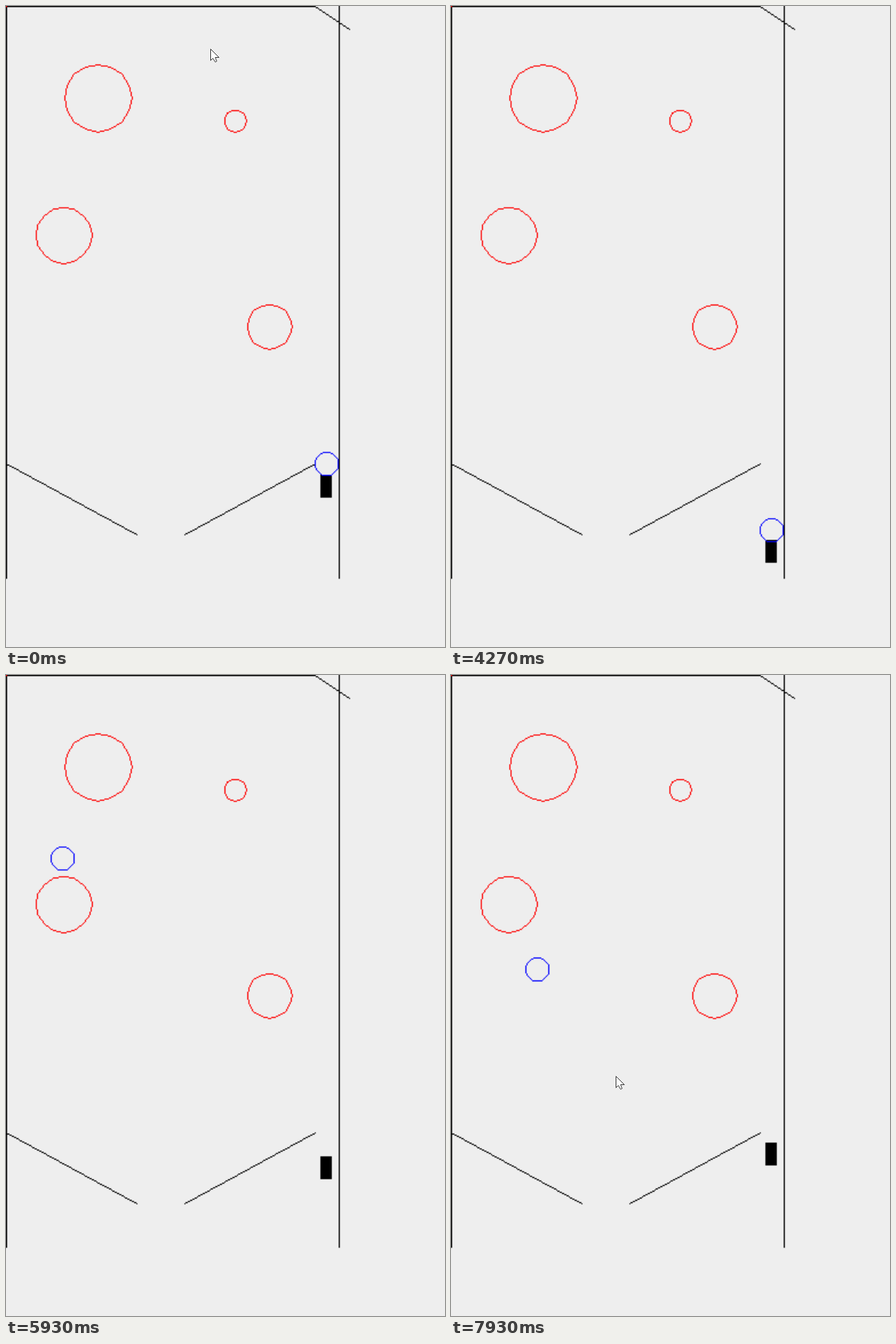
An HTML page with a canvas for the animation above (8000 ms loop, 576x841 px).

```html
<!DOCTYPE html>
<html lang="en">
<head>
<meta charset="utf-8">
<title>Pinball table</title>
<style>
  html, body { margin: 0; width: 100%; height: 100%; overflow: hidden; background: #eee; }
  canvas { display: block; width: 100vw; height: 100vh; }
</style>
</head>
<body>
<canvas id="stage" width="576" height="841"></canvas>
<script>
// The table is drawn on a small hard-edged board, then enlarged by half
const ZOOM = 1.5, LOOP = 8000, TICK = 200 / 3;
const PULL = 3600, LAUNCH = 4870, BOUNCE = 5470, CURSOR_IN = 7730, LAST = 7930;

const stage = document.getElementById('stage').getContext('2d');
const board = document.createElement('canvas');
board.width = 384;
board.height = 561;
const ctx = board.getContext('2d');

const walls = [
  [0, 0, 0, 500], [0, 0, 270, 0], [291, 0, 291, 500],
  [270, 0, 300, 20], [0, 400, 114, 462], [270, 400, 156, 462]
];
const bumpers = [[80, 80, 30], [200, 100, 10], [50, 200, 25], [230, 280, 20]];

// Legs of the ball's flight: each bounces from point to point at an even speed
const flight = [
  { from: LAUNCH, to: BOUNCE, points: [[280, 492], [280, 23]] },
  { from: BOUNCE, to: 6400, points: [[280, 23], [280, 18], [108, 109], [53, 166], [10, 100], [78, 10], [155, 86]] },
  { from: 6400, to: 7200, points: [[155, 86], [182, 108], [200, 426], [26, 288]] },
  { from: 7200, to: LAST, points: [[26, 288], [10, 274], [62, 233], [201, 287], [44, 412], [75, 257]] }
];

const mix = (a, b, u) => a.map((v, i) => v + (b[i] - v) * u);

// Point at the share u of a polyline's length
function along(points, u) {
  const lengths = points.slice(1).map((p, i) => Math.hypot(p[0] - points[i][0], p[1] - points[i][1]));
  let left = u * lengths.reduce((a, b) => a + b);
  let i = 0;
  while (i < lengths.length - 1 && left > lengths[i]) left -= lengths[i++];
  return mix(points[i], points[i + 1], Math.min(1, left / lengths[i]));
}

function ballAt(t) {
  if (t < PULL) return [280, 400];
  if (t < LAUNCH) return [280, 420 + 3.78 * (t - PULL) / TICK];
  const leg = flight.find(l => t <= l.to);
  return along(leg.points, (t - leg.from) / (leg.to - leg.from));
}

// Pulled down ever faster, then easing back after the launch
function plungerAt(t) {
  if (t < PULL) return 410;
  const n = (t - PULL) / TICK;
  if (t <= LAUNCH) return 432 + 2.74 * n + 0.07 * n * n;
  return 408.3 + 101 * Math.exp(-0.13 * (t - LAUNCH) / TICK);
}

function line(x0, y0, x1, y1) {
  const n = Math.max(Math.abs(x1 - x0), Math.abs(y1 - y0)) || 1;
  for (let i = 0; i <= n; i++) {
    ctx.fillRect(Math.round(x0 + (x1 - x0) * i / n), Math.round(y0 + (y1 - y0) * i / n), 1, 1);
  }
}

function ring(x, y, r, sides, snap, color) {
  const corner = i => {
    const a = (i % sides) * 2 * Math.PI / sides;
    return [x + snap(r * Math.cos(a)), y + snap(r * Math.sin(a))];
  };
  ctx.fillStyle = color;
  for (let i = 0; i < sides; i++) line(...corner(i), ...corner(i + 1));
}

// Cuts towards the centre, so only the rightmost corner keeps the full radius
const cut = v => Math.trunc(v > 0 ? v : v + 1e-6);

function drawCursor([x, y]) {
  stage.save();
  stage.translate(Math.round(x) + 0.5, Math.round(y) + 0.5);
  const arrow = new Path2D('M0 0V15L3 12L6 17L8 16L6 11H11Z');
  stage.fillStyle = '#fff';
  stage.fill(arrow);
  stage.strokeStyle = '#444';
  stage.stroke(arrow);
  stage.restore();
}

function draw(t) {
  ctx.fillStyle = '#eee';
  ctx.fillRect(0, 0, 384, 561);
  ctx.fillStyle = '#000';
  walls.forEach(w => line(...w));
  ctx.fillRect(275, Math.round(plungerAt(t)), 10, 20);
  ctx.fillStyle = '#f00';
  ctx.fillRect(0, 0, 1, 1);
  bumpers.forEach(([x, y, r]) => ring(x, y, r, 16, cut, '#f00'));
  const [x, y] = ballAt(t).map(Math.round);
  ring(x, y, 10, 24, Math.round, '#00f');

  stage.drawImage(board, 0, 0, 384 * ZOOM, 561 * ZOOM);
  if (t < 70) drawCursor([268, 56]);
  if (t >= CURSOR_IN) drawCursor(mix([190, 46], [216, 526], (t - CURSOR_IN) / (LAST - CURSOR_IN)));
}

// The table updates 15 times a second
function tableTime(ms) {
  const k = Math.floor((ms + 3.4) / TICK);
  return Math.min(LAST, Math.round(k * TICK / 10) * 10);
}

const start = performance.now();
function loop() {
  draw(tableTime((performance.now() - start) % LOOP));
  requestAnimationFrame(loop);
}
loop();
</script>
</body>
</html>
```
